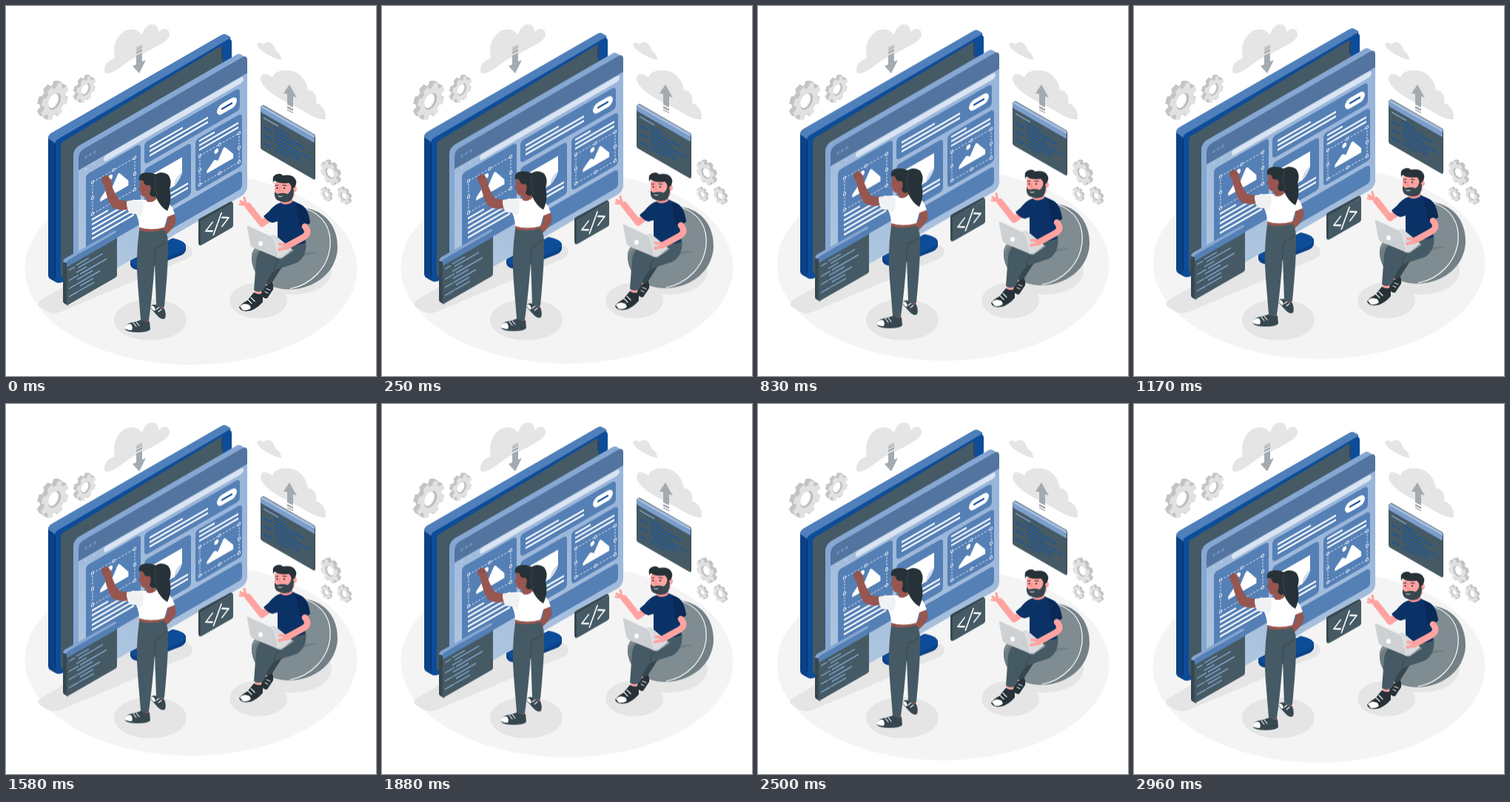
An HTML page that plays this animation: 500 by 500 pixels, repeating every 3000 ms.

```html
<!DOCTYPE html>
<html lang="en">
<head>
<meta charset="utf-8">
<title>Floating workspace</title>
<style>
  html, body { margin: 0; width: 100%; height: 100%; overflow: hidden; background: #fff; }
  svg { display: block; width: 100%; height: 100%; }
</style>
</head>
<body>
<svg id="stage" viewBox="0 0 500 500"></svg>
<script>
const C = {
  slate: '#455a64', dark: '#37474f', ink: '#263238',
  blue: '#0d4c99', deep: '#0b4186', card: '#5580b6', light: '#9ab5da', mid: '#86a7d3',
  navy: '#0b3266', brown: '#97564f', pink: '#ffa3a0', shade: '#e5e5e5'
};
const SLOPE = 0.577;

const path = (d, fill, extra = '') => `<path d="${d}" fill="${fill}" ${extra}/>`;
const line = (d, stroke, w, extra = '') =>
  `<path d="${d}" fill="none" stroke="${stroke}" stroke-width="${w}" stroke-linecap="round" stroke-linejoin="round" ${extra}/>`;
const rect = (x, y, w, h, fill, r = 0, extra = '') =>
  `<rect x="${x}" y="${y}" width="${w}" height="${h}" rx="${r}" fill="${fill}" ${extra}/>`;
const oval = (x, y, rx, ry, fill) => `<ellipse cx="${x}" cy="${y}" rx="${rx}" ry="${ry}" fill="${fill}"/>`;
// Vertical isometric plane; side -1 rises to the right, 1 falls to the right.
const plane = (x, y, side, body) => `<g transform="matrix(1 ${side * SLOPE} 0 1 ${x} ${y})">${body}</g>`;

function gear(x, y, r, side, depth) {
  const teeth = 8, step = Math.PI * 2 / teeth;
  const pts = [];
  for (let i = 0; i < teeth; i++)
    for (const [k, q] of [[-.33, .78], [-.23, 1], [.23, 1], [.33, .78]]) {
      const a = (i + k + .5) * step;
      pts.push((Math.cos(a) * r * q).toFixed(2) + ' ' + (Math.sin(a) * r * q).toFixed(2));
    }
  const face = 'M' + pts.join('L') + 'Z';
  const at = (dx, dy, body) =>
    `<g transform="matrix(.82 ${side * .47} 0 1 ${x + dx} ${y + dy})">${body}</g>`;
  let out = '';
  for (let d = depth; d > 0; d -= .5) out += at(side * d, -d * .55, path(face, '#c4c4c4'));
  out += at(0, 0, path(face, '#e1e1e1') + oval(0, 0, r * .45, r * .45, '#bfbfbf'));
  return out + at(side * depth * .35, -depth * .15, oval(0, 0, r * .36, r * .38, '#fff'));
}

function picture(x, y, w, h) {
  const px = k => (x + w * k).toFixed(1), py = k => (y + h * k).toFixed(1);
  const P = (a, b) => px(a) + ' ' + py(b);
  let out = rect(x, y, w, h, 'none', 0, 'stroke="#fff" stroke-width=".7" stroke-dasharray="2.6 1.8"');
  for (const i of [0, .5, 1]) for (const j of [0, .5, 1])
    if (i !== .5 || j !== .5)
      out += rect(x + w * i - 1.5, y + h * j - 1.5, 3, 3, C.card, 0, 'stroke="#fff" stroke-width=".7"');
  out += path(`M${P(.18, .75)}V${py(.66)}L${P(.34, .46)}Q${P(.37, .42)} ${P(.4, .46)}L${P(.46, .53)}L${P(.59, .22)}` +
    `Q${P(.62, .17)} ${P(.65, .22)}L${P(.85, .6)}V${py(.75)}Z`, '#fff');
  return out + oval(px(.42), py(.17), w * .055, w * .06, '#fff');
}

const lines = (rows, fill, h) => rows.map(([x, y, w]) => rect(x, y, w, h, fill)).join('');

function clouds() {
  return path('M134 91C130 82 138 73 147 71C142 50 156 28 173 32Q180 33 184 39C186 30 192 24 198 25C205 25 206 31 206 36C212 27 222 30 221 40C219 50 180 66 168 73C158 80 145 93 134 91Z', C.shade)
    + path('M344 99C344 91 352 90 360 97C363 84 388 84 398 94Q407 103 408 114C417 114 421 122 419 131C429 134 433 144 432 153C420 155 405 143 393 137C380 130 347 116 344 99Z', C.shade)
    + path('M339 52C341 48 346 49 348 52C352 45 362 49 364 60C369 62 372 68 372 73C364 72 341 61 339 52Z', C.shade)
    + path('M171 81L176 79V67L184 63V75L189 73L180 91ZM176 62L184 58V61L176 65ZM176 58.5L184 54.5V56.5L176 60.5ZM176 56L184 52.5V53.5L176 57Z', '#a4abb0')
    + path('M383 106L393 124L388 122V137L380 133V119L375 118ZM380 135L388 139V142L380 138ZM380 139.5L388 143.5V145L380 141Z', '#a4abb0');
}

function shadows() {
  return path('M46 398L210 302L248 325Q256 332 248 340L75 413Q66 417 56 413L46 407Q41 402 46 398Z', C.shade)
    + oval(195, 424, 49, 28, C.shade) + oval(341, 398, 39, 24, C.shade) + oval(388, 358, 52, 32, C.shade);
}

function monitor() {
  return path('M168 344L225 314Q243 319 243 324V330Q242 335 234 338L188 356Q171 359 168 350Z', C.deep)
    + path('M168 344L225 314Q243 317 243 325Q242 329 234 333L188 351Q171 353 168 345Z', C.blue)
    + path('M57 179Q57 175 61 172L290 40Q294 37 298 39L303 42V240L76 373Q71 375 67 373L60 369Q57 367 57 364Z', C.deep)
    + path('M57 179Q57 175 61 172L290 40Q294 37 298 39L304 43L71 181Q67 183 67 186Z', '#4f80bb')
    + path('M66 187Q66 183 70 180L299 46Q305 43 305 49V240L76 373Q66 377 66 367Z', C.blue)
    + path('M74 189Q74 186 76 184L289 55Q293 53 293 57V245L80 366Q74 369 74 362Z', C.slate)
    + line('M66.500 188V366M292 56V72', '#0a2f60', 1);
}

function browser() {
  let out = `<linearGradient id="glass" x1="1" y1="0" x2="0" y2="1">
    <stop offset=".3" stop-color="${C.light}"/><stop offset="1" stop-color="#b2c9e0"/></linearGradient>`;
  for (let d = 7; d > 0; d--) out += rect(-d, -5 - d * 1.14, 228, 187, C.mid, 8);
  out += rect(0, -5, 228, 187, 'url(#glass)', 8)
    + path('M0 20V3Q0 -5 8 -5H220Q228 -5 228 3V20Z', '#52749f')
    + rect(34, 21, 189, 8, '#dae4f2', 4);
  for (const x of [10, 16, 22]) out += oval(x, 8, 2, 2.1, '#6d8fbd');
  for (const x of [10, 21]) out += oval(x, 24, 1, 1, '#d0deef');
  for (const [x, y, w, h] of [[10, 32, 74, 109], [89, 34, 129, 30], [89, 70, 63, 71], [158, 70, 63, 71], [89, 147, 132, 25]])
    out += rect(x, y, w, h, C.card, 5);
  out += picture(19, 47, 57, 43) + picture(164, 95, 53, 39)
    + lines([
      [18, 96, 22], [18, 102.5, 57], [18, 109, 57], [18, 115.5, 57], [18, 122, 57],
      [96, 42.5, 45], [96, 48.5, 79], [96, 54.5, 79],
      [100, 122, 48], [100, 128, 48],
      [163, 73.5, 21], [163, 79.5, 53], [163, 85.5, 53]
    ], '#fff', 2.4)
    + rect(187, 42, 27, 14, '#fff', 7) + rect(193, 47.8, 15, 2.4, C.blue, 1)
    + path('M100 83H140V104Q131 104 130 116H100Z', '#fff')
    + path('M140 104Q132 103 130 116Q138 111 140 104Z', '#d3dfed');
  return plane(98, 202, -1, out);
}

function leftCode() {
  return path('M77 346L148 305L151 307L84 350V405L79 402Q77 401 77 399Z', C.dark)
    + path('M77 346Q77 343 80 341L146 304Q149 303 150 306L82 347Z', '#84a5d2')
    + plane(82, 345, -1,
      rect(0, 0, 68, 60, C.slate, 2) + rect(0, 0, 68, 8, C.card, 2)
      + lines([[13, 12, 17], [3, 13, 8], [16, 17, 33], [13, 22, 14], [3, 27, 13], [18, 27, 36], [14, 32, 21],
        [3, 38, 10], [14, 38, 31], [18, 43, 18], [3, 49, 12], [16, 49, 21]], C.mid, 1.6));
}

function rightCode() {
  return path('M344 139V136L348 134L416 173Q418 174 418 177V233L416 235L412 180Z', C.dark)
    + path('M344 138Q344 135 348 135L415 173Q418 175 417 179Z', '#a3bcde')
    + plane(344, 137, 1,
      rect(0, 0, 73, 56, C.slate, 2) + rect(0, 0, 73, 6, '#7b9ecd', 2)
      + lines([[4, 11, 20]], '#8eabd3', 1.5)
      + lines([[18, 15, 18], [19, 20, 40], [4, 23, 11], [18, 25, 27], [18, 30, 49], [4, 34, 10],
        [18, 35, 36], [23, 40, 31], [4, 45, 11], [18, 45, 20]], '#1556a8', 1.6));
}

function tagPanel() {
  return path('M260 290Q260 288 262 287L304 264L307 266L263 292V324L261 323Q260 322 260 320Z', C.dark)
    + plane(263, 291, -1, rect(0, 0, 44, 33, C.slate, 2)
      + line('M16 10.5L7 17L16 22.5M28 5L17.500 28M29 11.5L38 17L29 23.5', '#fff', 2));
}

function woman() {
  const shoe = (d, white, laces) => path(d, C.dark) + path(white, '#fff') + line(laces, '#fff', 1.1);
  return path('M205 399H214L213 412H205ZM182 421H193V432H182Z', C.brown)
    + shoe('M197 404Q205 402 208 408L214 409Q217 417 215 422Q211 425 205 419L196 409Z',
      'M196 406L198 405Q201 406 202 411L200 412Q196 409 196 406Z', 'M203 410L207 407M206 413L210 410')
    + shoe('M161 433Q164 428 174 427L183 424Q190 429 194 426L195 437Q192 441 178 441Q164 441 161 437Z',
      'M161 433Q164 429 169 430Q172 434 170 438Q164 438 161 436Z', 'M172 428L176 433M176 427L180 432')
    + path('M221 271Q232 284 229 294Q224 303 214 311L211 304Q220 294 218 283Z', C.brown)
    + path('M180 296H215V308H180Z', C.brown)
    + path('M180 303Q197 308 214 302Q220 309 219 328Q219 355 214 406Q208 409 203 405L201 346Q198 390 193 425Q187 428 182 424L178 375Q175 338 180 303Z', C.slate)
    + line('M201 348Q200 337 203 326Q212 325 216 318', C.dark, 1)
    + path('M167 264L153 262Q147 254 143 243Q143 234 138 230Q133 227 130 232Q128 238 133 243Q137 263 143 271Q150 277 167 275Z', C.brown)
    + line('M130 236L131 232M133 235V230M137 236V231', '#804640', .7)
    + path('M163 264Q174 261 188 262L204 260Q219 262 225 273L228 281L218 285L214 299Q196 304 180 299Q180 291 176 281L167 280Q163 273 163 264Z', '#fff')
    + path('M163 264Q172 262 185 264Q188 274 182 285L176 281L167 280Q163 273 163 264Z', '#f0f1f2')
    + path('M183 232Q180 240 181 244L179 248L182 250Q181 258 189 258L190 264Q197 267 203 261L206 238Z', C.brown)
    + path('M180 236Q178 226 189 225Q203 224 208 234L206 254Q198 262 194 254Q197 248 194 242Q187 244 186 237Q184 234 180 236Z', C.ink)
    + oval(193, 246, 2.6, 3.6, C.brown)
    + path('M199 230Q209 221 219 228Q225 236 221 247Q225 263 218 277Q209 272 203 259Q195 245 199 230Z', C.ink)
    + line('M203 231Q199 244 205 257', '#3e4c53', .8);
}

function beanbag() {
  return path('M404 273C433 277 449 300 448 328C446 360 418 382 384 383C354 383 333 366 332 341C331 326 345 316 370 312L396 287Z', '#738086')
    + path('M402 274C428 281 440 301 438 325C435 354 412 377 383 382C354 382 333 365 332 341C331 326 345 316 370 312Z', '#7f8c91')
    + path('M332 341Q334 333 345 328L394 336Q410 331 421 334Q389 337 364 362L359 378Q333 366 332 341Z', '#6f7c82')
    + line('M405 274C429 282 440 301 438 325C435 354 412 377 384 382', '#fff', 1.2);
}

function man() {
  return path('M348 368H359V383H348ZM336 379H348V394H336Z', C.pink)
    + path('M347 378Q351 381 358 371Q362 376 361 383L353 395Q347 396 345 389Z', C.ink)
    + line('M352 382L357 384M350 386L354 388', '#fff', 1)
    + path('M335 387Q341 391 347 388L347 400Q338 410 329 412Q317 414 315 407Q318 402 326 398Z', C.ink)
    + path('M316 406Q321 400 329 404L331 408Q327 412 320 411Z', '#fff')
    + line('M327 397L332 402M331 394L336 399', '#fff', 1.2)
    + path('M354 335L348 374Q355 379 360 373L376 348Z', C.dark)
    + path('M405 315L364 316Q340 327 338 344L335 384Q343 389 349 383Q353 367 363 357L393 347Q408 338 405 315Z', C.slate)
    + line('M363 356Q360 346 379 335', C.dark, 1)
    + line('M364 280Q356 287 346 294L327 270', C.pink, 9)
    + line('M329 274L323 267L317 264M324 268L322 259M325 269L316 268', C.pink, 3.2)
    + path('M370 266Q363 268 355 278L348 284Q353 291 360 293L367 291L367 321Q386 327 404 320L403 298L411 293Q409 273 398 268L387 263Z', C.navy)
    + path('M391 267Q406 268 411 293Q404 299 396 296Q395 278 391 267Z', '#092957')
    + path('M351 311L363 309L387 329L372 341L360 333Z', '#d9dcde')
    + line('M388 330L372 341L365 339', '#a6aeb3', 1.4)
    + line('M404 298Q412 307 401 313L379 325', C.pink, 8.5)
    + line('M380 323L370 322M378 327L369 329', C.pink, 4)
    + path('M328 297L358 311Q362 313 363 317L369 341L335 327Q331 325 330 321L326 300Q325 296 328 297Z', '#cdd1d4')
    + line('M328 297L358 311Q362 313 363 317L369 341', '#eceeef', 1)
    + oval(344, 321, 3, 3.3, '#fff')
    + path('M371 255H387V265Q379 271 371 266Z', '#f28f8f')
    + path('M363 239Q373 232 388 239L390 256Q385 264 373 263Q363 261 363 251Z', C.pink)
    + oval(389, 247, 4, 5, C.pink)
    + path('M363 251Q366 255 370 253Q376 252 380 254Q385 252 386 243L389 249Q389 261 383 264Q374 267 366 262Q362 258 363 251Z', C.dark)
    + path('M361 239Q359 228 367 227Q372 226 374 229Q387 227 391 234Q394 239 390 245L386 248Q386 242 382 239Q370 241 363 236Z', C.ink)
    + oval(366.5, 246, 1, 1.3, C.ink) + oval(376, 246, 1, 1.3, C.ink)
    + line('M364.5 242.5L368 242M374 242L379 242.5', C.ink, 1.1)
    + line('M370 245L369 250L372 250', '#f08683', .9)
    + line('M368 257Q370 258 373 257', '#fff', .9);
}

const stage = document.getElementById('stage');
stage.innerHTML =
  `<g class="float">${oval(250, 355, 224.5, 130, '#f4f4f4')}</g>`
  + clouds()
  + gear(66, 129, 23, -1, 5.5) + gear(108, 113, 16.5, -1, 4)
  + gear(437, 226, 15, 1, 4) + gear(432, 255, 8.5, 1, 2.5) + gear(456, 257, 10.5, 1, 3)
  + shadows()
  + `<g class="float">${monitor()}${browser()}${leftCode()}${rightCode()}${tagPanel()}${woman()}${beanbag()}${man()}</g>`;

for (const el of document.querySelectorAll('.float'))
  el.animate(
    [0, -10, 0].map(y => ({ transform: `translate(0px, ${y}px)` })),
    { duration: 3000, iterations: Infinity, easing: 'linear' }
  );
</script>
</body>
</html>
```
